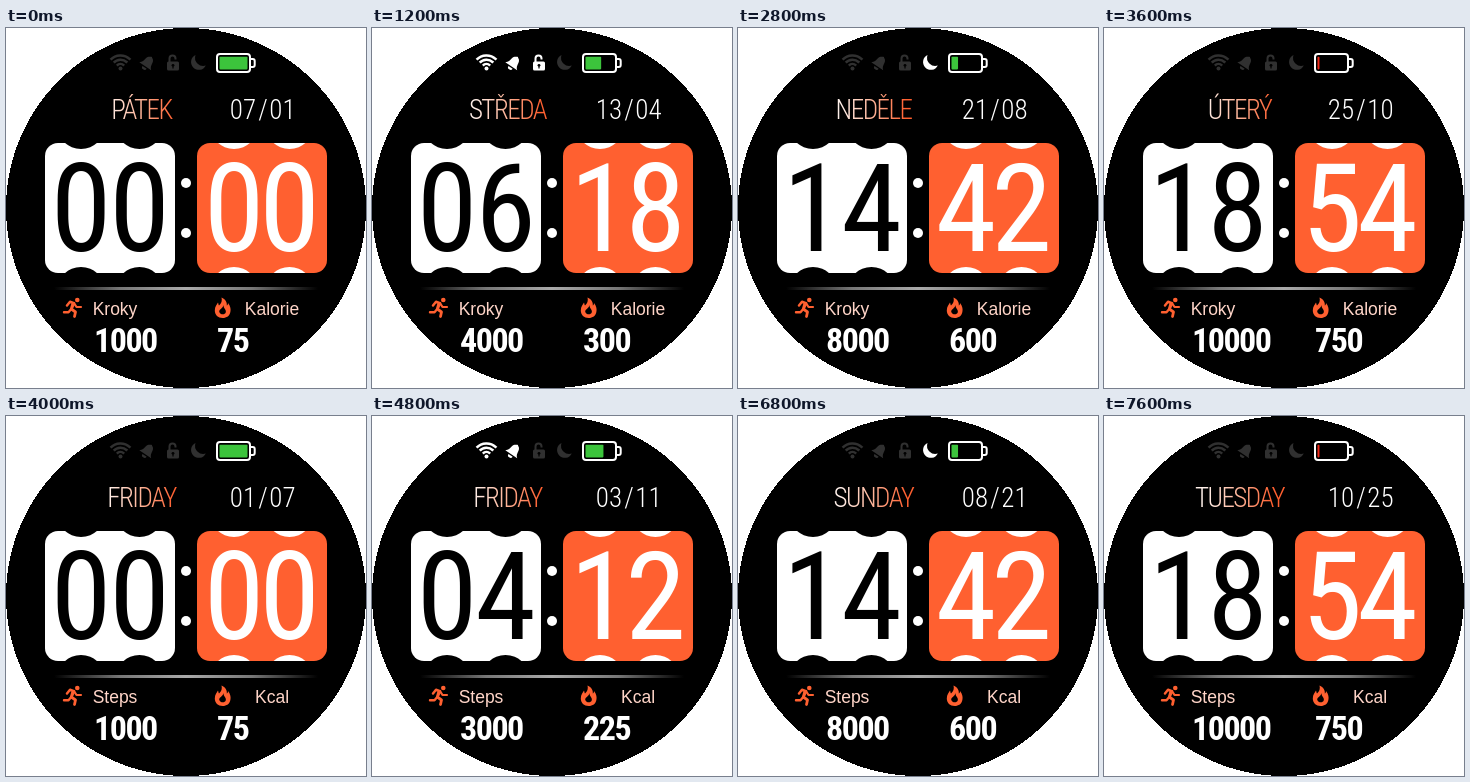
Animation, 360 px wide and 360 px high, one loop 8 s. Source, as an HTML page with a canvas:

```html
<!DOCTYPE html>
<html lang="en">
<head>
<meta charset="utf-8">
<title>Watch face</title>
<style>
html, body { margin: 0; width: 100%; height: 100%; overflow: hidden; background: #fff; }
canvas { display: block; width: 360px; height: 360px; }
</style>
</head>
<body>
<canvas id="face" width="360" height="360"></canvas>
<script>
const ctx = document.getElementById('face').getContext('2d');
const STEP = 400, STATES = 10;
const ORANGE = '#ff6030', WHITE = '#fff', DIM = '#303030', GREEN = '#3cc43c', RED = '#f02818';
const PEACH = '#ffd5c8';
const CONDENSED = '"Roboto Condensed", Roboto, sans-serif';
const PLAIN = '"Liberation Sans", Arial, sans-serif';
const DIGITS = `400 condensed 123px ${CONDENSED}`;
const TITLE = `350 condensed 27px ${CONDENSED}`;
const VALUE = `600 condensed 34px ${CONDENSED}`;
const LABEL = `17.5px ${PLAIN}`;
const LANGS = [
  { days: ['NEDĚLE', 'PONDĚLÍ', 'ÚTERÝ', 'STŘEDA', 'ČTVRTEK', 'PÁTEK', 'SOBOTA'],
    steps: 'Kroky', energy: 'Kalorie', dayFirst: true },
  { days: ['SUNDAY', 'MONDAY', 'TUESDAY', 'WEDNESDAY', 'THURSDAY', 'FRIDAY', 'SATURDAY'],
    steps: 'Steps', energy: 'Kcal', dayFirst: false }
];
const pad = n => String(n).padStart(2, '0');

function text(str, x, y, font, color, { align = 'center', spacing = 0 } = {}) {
  ctx.font = font;
  ctx.letterSpacing = `${spacing}px`;
  ctx.textAlign = align;
  ctx.fillStyle = color;
  ctx.fillText(str, x, y);
}

function gradient(x0, x1, stops) {
  const g = ctx.createLinearGradient(x0, 0, x1, 0);
  stops.forEach((c, i) => g.addColorStop(i / (stops.length - 1), c));
  return g;
}

function box(x, y, w, h, r) {
  ctx.beginPath();
  ctx.roundRect(x, y, w, h, r);
}

function dot(x, y, r, color) {
  ctx.fillStyle = color;
  ctx.beginPath();
  ctx.arc(x, y, r, 0, 2 * Math.PI);
  ctx.fill();
}

function shape(d, color, lineWidth) {
  const path = new Path2D(d);
  if (lineWidth) {
    ctx.strokeStyle = color;
    ctx.lineWidth = lineWidth;
    ctx.stroke(path);
  } else {
    ctx.fillStyle = color;
    ctx.fill(path);
  }
}

// The round screen has a hard, stepped edge.
function screen() {
  ctx.fillStyle = WHITE;
  ctx.fillRect(0, 0, 360, 360);
  ctx.fillStyle = '#000';
  for (let y = 0; y < 360; y++) {
    const half = Math.round(Math.sqrt(180 ** 2 - (y + 0.5 - 180) ** 2));
    ctx.fillRect(180 - half, y, 2 * half, 1);
  }
}

// One drum with the edges of the neighbouring digits showing.
function drum(x, value, back, ink, centers) {
  ctx.save();
  box(x, 115, 130, 130, 13);
  ctx.fillStyle = back;
  ctx.fill();
  ctx.clip();
  [...pad(value)].forEach((digit, i) => {
    dot(centers[i], 97, 24, ink);
    dot(centers[i], 263, 24, ink);
    text(digit, centers[i], 223, DIGITS, ink);
  });
  ctx.restore();
}

function wifi(color) {
  ctx.lineCap = 'butt';
  ctx.strokeStyle = color;
  ctx.lineWidth = 2.5;
  for (const r of [5, 9.3, 13.6]) {
    ctx.beginPath();
    ctx.arc(114.5, 41, r, -Math.PI * 0.76, -Math.PI * 0.24);
    ctx.stroke();
  }
  dot(114.5, 40.5, 2, color);
}

function bell(color) {
  ctx.save();
  ctx.translate(141.5, 35);
  ctx.rotate(0.6);
  shape('M-7.2 4C-4.5 2-4.5 0-4-3C-3.6-5.5-2-6.5-1-6.8A1.2 1.2 0 0 1 1-6.8C2-6.5 3.6-5.5 4-3C4.5 0 4.5 2 7.2 4Z', color);
  shape('M-2.5 5.2H2.5A2.5 2.5 0 0 1-2.5 5.2Z', color);
  ctx.restore();
}

function lock(color) {
  shape('M163.5 34V30.5A3 3 0 0 1 169.5 30.5V31.5', color, 2);
  box(161, 33.5, 12, 9, 1.5);
  ctx.fillStyle = color;
  ctx.fill();
  dot(167, 37.3, 1.4, '#000');
  ctx.fillRect(166.4, 37.5, 1.2, 3);
}

function moon(color) {
  shape('M189.5 27A7.8 7.8 0 1 0 199.8 37.6A8.3 8.3 0 0 1 189.5 27Z', color);
}

function battery(k) {
  const width = k ? 22.5 - 2.28 * k : 28;
  ctx.strokeStyle = WHITE;
  ctx.lineWidth = 2;
  box(211, 26, 33, 18, 3);
  ctx.stroke();
  box(244, 31, 4.7, 8, [0, 2, 2, 0]);
  ctx.stroke();
  box(213.5, 28.8, width, 12.6, 0.8);
  ctx.fillStyle = k < 8 ? GREEN : RED;
  ctx.fill();
}

function runner() {
  ctx.lineCap = ctx.lineJoin = 'round';
  dot(71.3, 272, 2.3, ORANGE);
  shape('M61 277.5L64 273.8L68 275.2L65.5 281', ORANGE, 2.5);
  shape('M68 275.2L70.5 279H75', ORANGE, 2.2);
  shape('M66.5 276.5L65.3 281L69.5 284L68.5 288.5', ORANGE, 2.8);
  shape('M64.8 281.5L62.5 284.2H58', ORANGE, 2.4);
}

function flame() {
  shape('M215.5 269.5C221 272 221 276 220.8 277.5C222 277 222 275.5 222 275C224.5 278 224.8 281 224.5 283C224 288 220.5 290 216.7 290C212 290 208.8 287 208.8 282.5C208.8 278.5 211 276.5 212 274.5C212.6 276 212.5 277 213 277.6C215.5 275.5 216.3 272.5 215.5 269.5Z', ORANGE);
  shape('M217.5 277C217.5 281 220.5 281.5 219.8 284.2C219 287 214.3 287 213.3 284C212.6 281.5 217 280.5 217.5 277Z', '#000');
}

function draw(time) {
  const index = Math.floor(time / STEP) % (STATES * LANGS.length);
  const k = index % STATES;
  const lang = LANGS[Math.floor(index / STATES)];
  const month = k + 1, day = 7 + 2 * k;
  const weekday = new Date(2022, k, day).getDay();

  screen();

  // Each icon lights one state after the last and stays on for four.
  [wifi, bell, lock, moon].forEach((icon, i) => icon(k > i && k < i + 5 ? WHITE : DIM));
  battery(k);

  const fade = gradient(102, 168, ['#fff0ea', '#ffb498', ORANGE]);
  text(lang.days[weekday], 135.5, 91, TITLE, fade, { spacing: -1.5 });
  const [first, second] = lang.dayFirst ? [day, month] : [month, day];
  text(pad(first), 237, 91, TITLE, WHITE);
  text('/', 257, 91, TITLE, WHITE);
  text(pad(second), 276.5, 91, TITLE, WHITE);

  drum(39, 2 * k, WHITE, '#000', [75, 133.5]);
  drum(191, 6 * k, ORANGE, WHITE, [228, 283.5]);
  dot(180, 155, 5, WHITE);
  dot(180, 205, 5, WHITE);

  ctx.fillStyle = gradient(48, 312, ['#000', '#777', '#aaa', '#777', '#000']);
  ctx.fillRect(48, 259, 264, 3);

  runner();
  flame();
  text(lang.steps, 109, 287, LABEL, PEACH);
  text(lang.energy, 266, 287, LABEL, PEACH);
  text(1000 * (k + 1), 88, 323.5, VALUE, WHITE, { align: 'left', spacing: -1.5 });
  text(75 * (k + 1), 211, 323.5, VALUE, WHITE, { align: 'left', spacing: -1.5 });
}

const start = performance.now();
function tick() {
  draw(performance.now() - start);
  requestAnimationFrame(tick);
}
tick();
</script>
</body>
</html>
```
